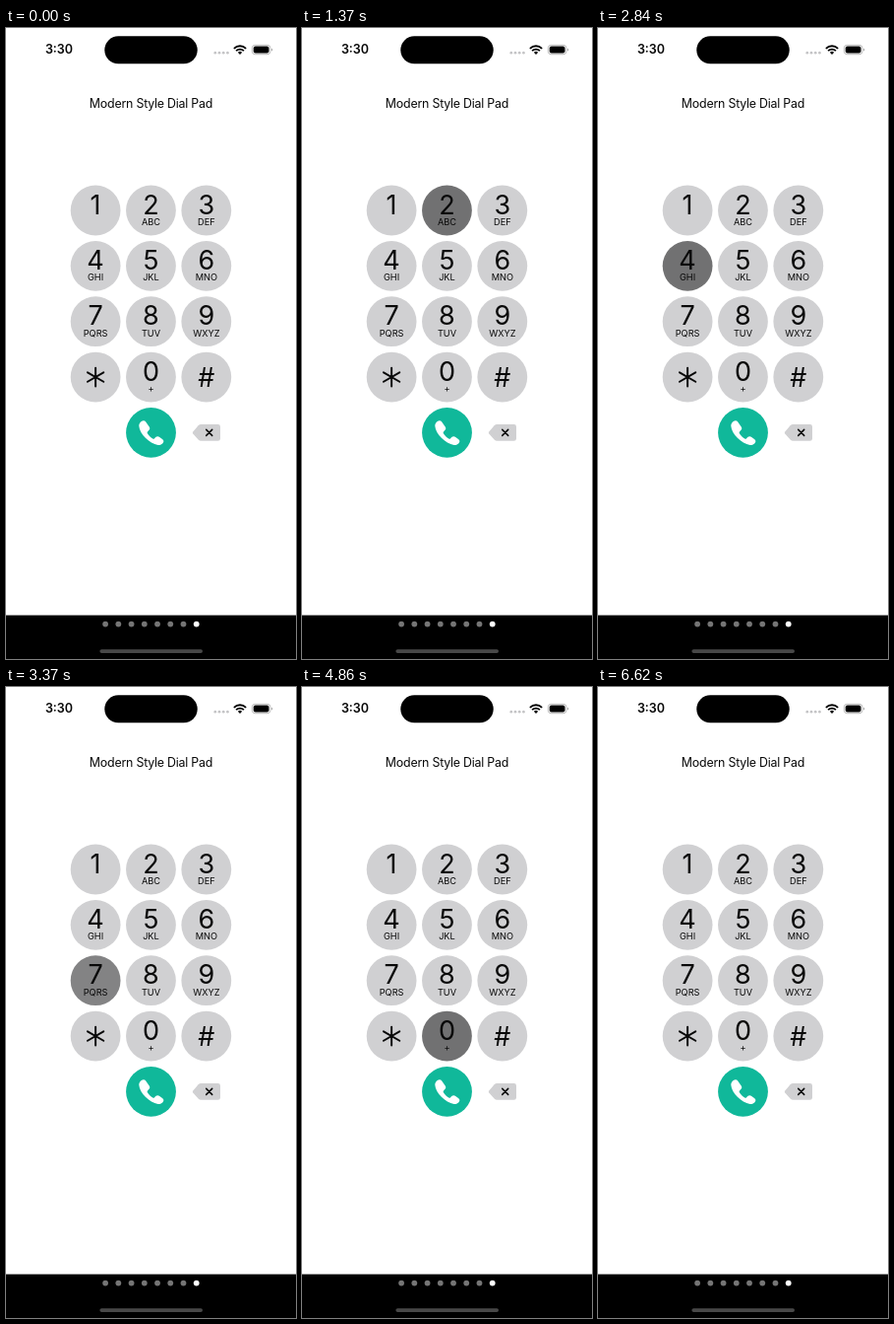
Recreate the animation shown at these times as an HTML page. Size 295 px wide and 640 px high, loop 7980 ms.

```html
<!DOCTYPE html>
<html lang="en">
<head>
<meta charset="utf-8">
<title>Dial Pad</title>
<style>
  html, body { margin: 0; height: 100%; overflow: hidden; background: #fff; }
  svg { display: block; width: 100vw; height: 100vh; }
  text { font-family: Inter, "Liberation Sans", sans-serif; text-anchor: middle; fill: #090909; }
  .time { font-size: 12.5px; font-weight: 600; }
  .title { font-size: 12.4px; letter-spacing: -.22px; }
  .digit { font-size: 27px; }
  .letters { font-size: 9.2px; }
  .line { fill: none; stroke: #090909; stroke-linecap: round; }

  .tap {
    --up: #d0d0d2;
    --down: #717172;
    fill: var(--up);
    animation: tap 7980ms var(--at) infinite;
  }
  .call { --up: #10b89a; --down: #096353; }

  /* Dark at once, a short hold, then a fade back */
  @keyframes tap {
    0% { fill: var(--down); }
    2.13% { fill: var(--down); animation-timing-function: ease-in-out; }
    6.77%, 100% { fill: var(--up); }
  }
</style>
</head>
<body>
<svg viewBox="0 0 295 640">
  <!-- Status bar -->
  <text class="time" x="54" y="26.4">3:30</text>
  <rect x="100.3" y="8.3" width="94.4" height="28" rx="14"/>
  <g fill="#c4c4c6">
    <circle cx="212.8" cy="25.2" r="1.35"/>
    <circle cx="217" cy="25.2" r="1.35"/>
    <circle cx="221.2" cy="25.2" r="1.35"/>
    <circle cx="225.4" cy="25.2" r="1.35"/>
  </g>
  <g fill="none" stroke="#000" stroke-width="1.9">
    <path d="M231.9 20.8a8.6 8.6 0 0 1 12.2 0"/>
    <path d="M234.1 23.2a5.5 5.5 0 0 1 7.8 0"/>
  </g>
  <path d="M238 26.9l-2.1-2.2a3 3 0 0 1 4.2 0z"/>
  <rect x="250.3" y="17.3" width="18.6" height="9.4" rx="3" fill="none" stroke="#a9a9a9" stroke-width=".8"/>
  <rect x="251.7" y="18.6" width="15.8" height="6.8" rx="1.9"/>
  <path d="M270 20.4q1.2.5 1.2 1.6t-1.2 1.6z" fill="#a9a9a9"/>

  <text class="title" x="147.5" y="80.6">Modern Style Dial Pad</text>

  <g id="pad"></g>

  <circle class="tap call" style="--at:5370ms" cx="147.5" cy="410.4" r="25.4"/>
  <path fill="#fff" d="M135.3 403.8C135.2 401.9 136.1 400.4 137.7 399.1C139.4 397.7 141.1 397.9 142.2 399.4
    L145.7 404.4C146.6 405.8 146.4 407 145.3 408.1L144 409.5C143.5 410 143.5 410.6 143.9 411.2
    C145.1 413.2 147.2 415.3 149.2 416.5C149.8 416.9 150.4 416.9 150.9 416.4L152.2 415.1
    C153.3 414 154.6 413.8 155.9 414.7L159 416.9C160.7 418.1 160.8 419.6 159.4 421.2
    C158.1 422.6 156.4 423.2 154.6 422.9C145.8 421.5 135.9 412 135.3 403.8Z"/>

  <path class="tap" style="--at:6080ms" d="M190.2 409.4L195.6 403.2Q196.7 402 198.4 402H215.6Q218 402 218 404.4
    V416.4Q218 418.8 215.6 418.8H198.4Q196.7 418.8 195.6 417.6L190.2 411.4Q189.4 410.4 190.2 409.4Z"/>
  <path class="line" stroke-width="1.5" d="M203.7 407.4l6 6m0-6l-6 6"/>

  <!-- Page bar -->
  <rect y="595.6" width="295" height="44.4"/>
  <g id="dots"></g>
  <rect x="95.4" y="630.2" width="104.6" height="3.8" rx="1.9" fill="#484848"/>
</svg>
<script>
  // label, letters, tap time in ms
  const keys = [
    ['1', '', 730], ['2', 'ABC', 1265], ['3', 'DEF', 1570],
    ['4', 'GHI', 2720], ['5', 'JKL', 2310], ['6', 'MNO', 1960],
    ['7', 'PQRS', 3090], ['8', 'TUV', 3460], ['9', 'WXYZ', 3870],
    ['*', '', 5080], ['0', '+', 4715], ['#', '', 4220]
  ];
  const step = 56.35;

  const label = (cls, x, y, s) => `<text class="${cls}" x="${x}" y="${y}">${s}</text>`;

  function star(x, y) {
    const arms = [30, 90, 150].map(deg => {
      const a = deg * Math.PI / 180, dx = 9.4 * Math.cos(a), dy = 9.4 * Math.sin(a);
      return `M${x - dx} ${y - dy}L${x + dx} ${y + dy}`;
    });
    return `<path class="line" stroke-width="2" d="${arms.join('')}"/>`;
  }

  document.getElementById('pad').innerHTML = keys.map(([main, sub, at], i) => {
    const x = 91.1 + i % 3 * step, y = 185 + Math.floor(i / 3) * step;
    const face = main === '*' ? star(x, y)
      : label('digit', x, y + (main === '#' ? 9.8 : 3.6), main);
    return `<circle class="tap" style="--at:${at}ms" cx="${x}" cy="${y}" r="25.4"/>`
      + face + label('letters', x, y + 15.1, sub);
  }).join('');

  document.getElementById('dots').innerHTML = Array.from({ length: 8 }, (_, i) =>
    `<circle cx="${101.1 + i * 13.23}" cy="604.6" r="2.9" fill="${i === 7 ? '#fff' : '#757575'}"/>`
  ).join('');
</script>
</body>
</html>
```
